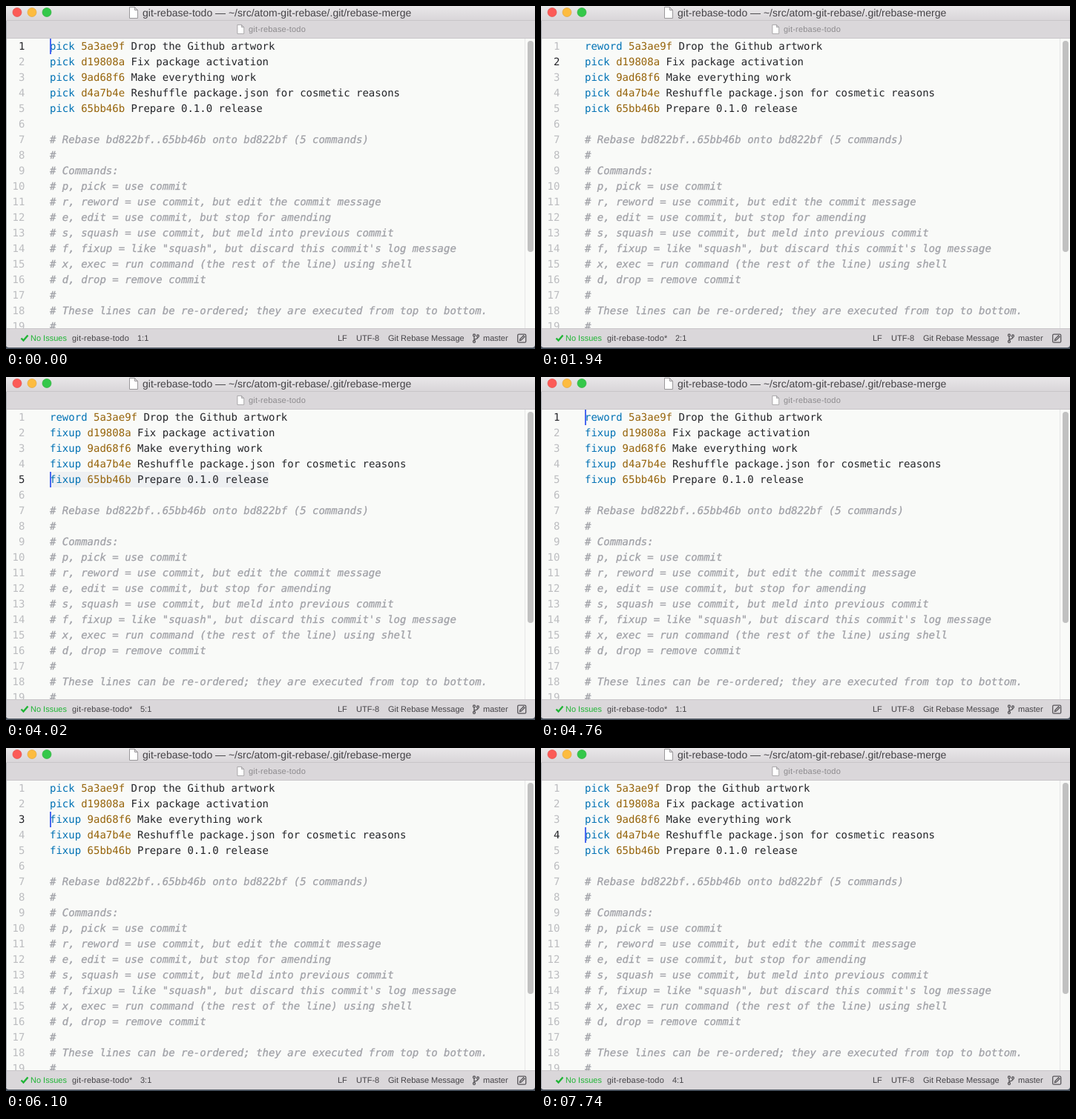
Animation of 713x463 px, one loop 8.04 s. Source, as an HTML page:

```html
<!DOCTYPE html>
<html lang="en">
<head>
<meta charset="utf-8">
<title>Interactive rebase</title>
<style>
  html, body { margin: 0; width: 100%; height: 100%; overflow: hidden; }
  svg { display: block; width: 713px; height: 463px; }
  text { white-space: pre; text-rendering: geometricPrecision; }
  .ui { font: 11px "Liberation Sans", Arial, sans-serif; fill: #454347; }
  .code { font: 14px "DejaVu Sans Mono", monospace; fill: #242529; }
  .number { fill: #bcbdc0; text-anchor: end; }
  .number.current { fill: #242529; }
  .verb { fill: #0072b5; }
  .hash { fill: #96640a; }
  .comment { fill: #a0a1a7; font-style: italic; stroke: #a0a1a7; stroke-width: .3px; }
</style>
</head>
<body>
<svg viewBox="0 0 713 463">
  <defs>
    <linearGradient id="bar" x2="0" y2="1">
      <stop stop-color="#e9e7e9"/><stop offset="1" stop-color="#d8d5d8"/>
    </linearGradient>
    <g id="page" fill="#fff" stroke="#9a989b">
      <path d="M.5 .5H7.5L11.5 4.5V15.5H.5ZM7.5 .5V4.5H11.5"/>
    </g>
  </defs>
  <rect width="713" height="463" fill="#f9faf8"/>
  <g id="editor"></g>

  <path d="M699.5 43V435" stroke="#e6e6e6"/>
  <rect x="703" y="47" width="8" height="285" rx="4" fill="#c1c1c1"/>

  <rect width="713" height="20" fill="url(#bar)"/>
  <rect y="20" width="713" height="23" fill="#dad7da"/>
  <path d="M0 19.5H713M0 43.5H713" stroke="#c9c6c9"/>
  <g stroke-width=".6">
    <circle cx="15" cy="8.5" r="6" fill="#fc5b57" stroke="#df4744"/>
    <circle cx="35" cy="8.5" r="6" fill="#fdbc40" stroke="#de9f34"/>
    <circle cx="55" cy="8.5" r="6" fill="#34c84a" stroke="#27aa35"/>
  </g>
  <use href="#page" x="166" y="1"/>
  <text class="ui" x="184" y="14" style="font-size:14px">git-rebase-todo — ~/src/atom-git-rebase/.git/rebase-merge</text>
  <use href="#page" transform="translate(311.5 25) scale(.8)"/>
  <text class="ui" x="327" y="35" style="fill:#8c8a8d;letter-spacing:.2px">git-rebase-todo</text>

  <rect y="435" width="713" height="28" fill="#4c5560"/>
  <path d="M0 435H713V457Q713 461 709 461H4Q0 461 0 457Z" fill="#dad7da"/>
  <path d="M0 435.5H713" stroke="#c9c6c9"/>
  <path d="M.5 20V458" stroke="#a9abb0"/>
  <path d="M20.5 448.5L23.5 451.5L29.5 444.5" fill="none" stroke="#1fb535" stroke-width="2.4"/>
  <g class="ui">
    <text x="33" y="452" fill="#1fb535">No Issues</text>
    <text id="file" x="89" y="452" style="letter-spacing:.2px"></text>
    <text id="place" y="452"></text>
    <text x="447" y="452">LF</text>
    <text x="472" y="452">UTF-8</text>
    <text x="515" y="452">Git Rebase Message</text>
    <text x="643" y="452">master</text>
  </g>
  <g fill="none" stroke="#59575b" stroke-width="1.3">
    <circle cx="631" cy="444.5" r="1.5"/>
    <circle cx="631" cy="453" r="1.5"/>
    <circle cx="636" cy="445.5" r="1.5"/>
    <path d="M631 446V451.5M636 447Q636 449.5 631 450"/>
    <rect x="689.7" y="443.2" width="11" height="11" rx="1.5"/>
    <path d="M692.5 451.5L693 449.5L697.5 445L699 446.5L694.5 451Z"/>
  </g>
</svg>
<script>
const LEFT = 59, TOP = 44, ROW = 21, LOOP = 8040;
const commits = [
  ["5a3ae9f", "Drop the Github artwork"],
  ["d19808a", "Fix package activation"],
  ["9ad68f6", "Make everything work"],
  ["d4a7b4e", "Reshuffle package.json for cosmetic reasons"],
  ["65bb46b", "Prepare 0.1.0 release"],
];
const notes = `
# Rebase bd822bf..65bb46b onto bd822bf (5 commands)
#
# Commands:
# p, pick = use commit
# r, reword = use commit, but edit the commit message
# e, edit = use commit, but stop for amending
# s, squash = use commit, but meld into previous commit
# f, fixup = like "squash", but discard this commit's log message
# x, exec = run command (the rest of the line) using shell
# d, drop = remove commit
#
# These lines can be re-ordered; they are executed from top to bottom.
#`.split("\n");

// [time, row, caret visible, new verb for that row]
const steps = [
  [0, 1, 1], [440, 1, 0], [740, 1, 1], [1190, 1, 1, "reword"],
  [1340, 2, 1], [1940, 2, 0], [2240, 2, 1, "fixup"],
  [2540, 3, 1], [2690, 3, 1, "fixup"],
  [2830, 4, 1], [2980, 4, 1, "fixup"],
  [3280, 5, 1], [3430, 5, 1, "fixup"], [3730, 5, 0], [4020, 5, 1],
  [4320, 4, 1], [4470, 3, 1], [4610, 2, 1], [4760, 1, 1],
  [5060, 1, 0], [5210, 1, 1, "pick"],
  [5350, 2, 1], [5800, 2, 0], [5950, 2, 1, "pick"],
  [6100, 3, 1], [6250, 3, 1, "pick"],
  [6400, 4, 1], [6700, 4, 1, "pick"],
  [6990, 5, 1], [7440, 5, 0, "pick"], [7740, 4, 1],
];

const $ = id => document.getElementById(id);
function add(parent, tag, attrs, content = "") {
  const el = document.createElementNS("http://www.w3.org/2000/svg", tag);
  for (const key in attrs) el.setAttribute(key, attrs[key]);
  el.textContent = content;
  return parent.appendChild(el);
}

const editor = $("editor");
const glow = add(editor, "rect", {x: LEFT, y: TOP + 4 * ROW, width: 295, height: ROW, fill: "#eef0f2"});
const numbers = [], verbs = [];
for (let i = 0; i < 19; i++) {
  const y = TOP + i * ROW + 15;
  numbers.push(add(editor, "text", {class: "code number", x: 25.4, y}, i + 1));
  const line = add(editor, "text", {class: "code", x: LEFT, y});
  if (i < 5) {
    const [hash, message] = commits[i];
    verbs.push(add(line, "tspan", {class: "verb"}));
    add(line, "tspan", {class: "hash"}, ` ${hash} `);
    add(line, "tspan", {}, message);
  } else {
    add(line, "tspan", {class: "comment"}, notes[i - 5]);
  }
}
const caret = add(editor, "rect", {x: LEFT, width: 2, height: ROW, fill: "#4a68f0"});

let shown = -1;
function show(index) {
  if (index === shown) return;
  shown = index;
  const [time, row, on] = steps[index];
  const words = Array(5).fill("pick");
  for (const [, r, , word] of steps.slice(0, index + 1)) if (word) words[r - 1] = word;
  words.forEach((word, i) => verbs[i].textContent = word);
  numbers.forEach((n, i) => n.classList.toggle("current", i === row - 1));
  caret.setAttribute("y", TOP + (row - 1) * ROW);
  caret.setAttribute("visibility", on ? "visible" : "hidden");
  glow.setAttribute("visibility", time >= 3430 && time < 4320 ? "visible" : "hidden");
  const edited = time >= 1190 && time < 7740;
  $("file").textContent = "git-rebase-todo" + (edited ? "*" : "");
  $("place").setAttribute("x", edited ? 181 : 177);
  $("place").textContent = row + ":1";
}

const start = performance.now();
function frame() {
  const t = (performance.now() - start) % LOOP;
  show(steps.findLastIndex(step => step[0] <= t));
  requestAnimationFrame(frame);
}
frame();
</script>
</body>
</html>
```
